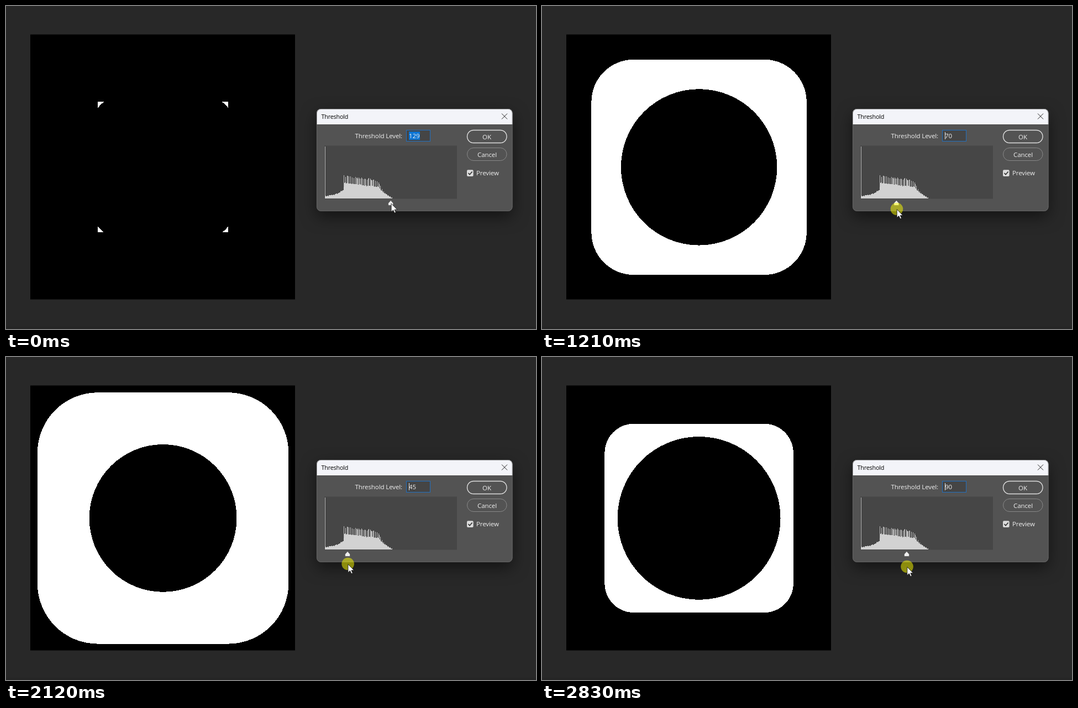
Animation of 959 by 584 pixels, one loop 2.93 s. Source, as an HTML page:

```html
<!DOCTYPE html>
<html lang="en">
<head>
<meta charset="utf-8">
<title>Threshold</title>
<style>
  html, body { margin: 0; width: 100%; height: 100%; overflow: hidden; background: #282828; }
  svg { display: block; }
  text { font: 11.5px "Open Sans", "Noto Sans", sans-serif; letter-spacing: -.1px; fill: #f0f0f0; }
  .title { font-size: 10.8px; letter-spacing: -.2px; fill: #000; }
  .mid { text-anchor: middle; }
  .crisp { shape-rendering: crispEdges; }
  .dialog { filter: drop-shadow(0 10px 14px rgba(0, 0, 0, .5)); }
</style>
</head>
<body>
<svg width="959" height="584" viewBox="0 0 959 584">
  <rect y="580" width="959" height="4" fill="#252525"/>

  <rect x="44" y="51.5" width="479" height="479"/>
  <g class="crisp">
    <rect id="square" fill="#fff"/>
    <circle id="disc" cx="284.1" cy="291.4"/>
  </g>

  <g class="dialog">
    <rect x="562" y="186" width="354.5" height="185" rx="8" fill="#535353"/>
    <path d="M562 214V194a8 8 0 0 1 8-8h338.5a8 8 0 0 1 8 8v20z" fill="#f3f4f9"/>
  </g>
  <rect x="562.4" y="186.4" width="353.7" height="184.2" rx="7.6" fill="none" stroke="#707070" stroke-width=".7"/>
  <text class="title" x="570.5" y="204">Threshold</text>
  <path d="M897 194.5l10 10m0-10l-10 10" stroke="#222"/>

  <text x="631.5" y="238.5">Threshold Level:</text>
  <rect x="724.5" y="224.5" width="43" height="20" fill="#454545" stroke="#2270c0"/>
  <rect id="selection" x="729" y="227" width="20" height="15" fill="#0a74d4"/>
  <text id="level" x="729" y="238.5"></text>
  <path id="caret" class="crisp" d="M729.5 228v13" stroke="#eee"/>

  <rect x="834.5" y="224.5" width="71.5" height="23" rx="11.5" fill="none" stroke="#dedede" stroke-width="1.4"/>
  <text class="mid" x="870" y="240.5">OK</text>
  <rect x="834.5" y="256.5" width="71.5" height="23" rx="11.5" fill="none" stroke="#888"/>
  <text class="mid" x="870.5" y="272.5">Cancel</text>
  <rect x="834" y="296.3" width="11.6" height="11.6" rx="2" fill="#dcdcdc"/>
  <path d="M836.5 302l2.5 2.8 4.5-5.3" fill="none" stroke="#333" stroke-width="1.7"/>
  <text x="851" y="306">Preview</text>

  <rect x="576" y="252.5" width="240" height="96" fill="#464646"/>
  <g class="crisp">
    <path d="M577.5 254v93" stroke="#b4b4b4" stroke-width="1.5"/>
    <path id="spikes" stroke="#bababa"/>
    <path id="bars" stroke="#d2d2d2"/>
  </g>

  <path id="slider" d="M0 351.5l4.5 5v4h-9v-4z" fill="#eee" stroke="#444" stroke-width=".6"/>
  <g id="pointer">
    <circle id="press" r="11.3" fill="#ff0" fill-opacity=".5"/>
    <path d="M.3 .7v15l3.5-3.3 2.5 5.3 2.3-1-2.3-5h4.8z" fill="#fff" stroke="#111" stroke-width=".8"/>
  </g>
</svg>

<script>
const $ = id => document.getElementById(id);
const set = (id, attrs) => {
  for (const name in attrs) $(id).setAttribute(name, attrs[name]);
};

// Piecewise linear curve through [x, y] points, held flat before the first
function curve(points, x) {
  const i = Math.max(1, points.findIndex(p => p[0] >= x));
  const [[x0, y0], [x1, y1]] = [points[i - 1], points[i]];
  return y0 + (y1 - y0) * Math.max(0, x - x0) / (x1 - x0);
}

let seed = 7;
const random = () => (seed = seed * 16807 % 2147483647) / 2147483647;

function drawHistogram() {
  const body = [[577, 3], [600, 8], [610, 15], [612, 28], [673, 20], [684, 9], [699, 0]];
  const peaks = [[611, 42], [666, 35], [674, 29], [685, 10], [699, 0]];
  let bars = "", spikes = "";
  for (let x = 577; x < 699; x++) {
    const column = height => `M${x}.5 347.5v${-Math.max(1, height)}`;
    bars += column(curve(body, x) + random() * 2 - 1);
    if (x > 610 && (x % 3 === 2 || random() < .25)) {
      spikes += column(curve(peaks, x) - random() * 3);
    }
  }
  set("bars", { d: bars });
  set("spikes", { d: spikes });
}

// The drag advances in equal ticks; both paths are [tick, value]
const LOOP = 2930, TICKS = 29;
const levelPath = [[1, 129], [7, 103], [8, 94], [12, 70], [15, 59], [17, 49], [18, 49],
  [21, 45], [22, 45], [26, 69], [28, 90]];
const heightPath = [[1, 356.5], [8, 361], [12, 367], [21, 374], [26, 375.3], [28, 379]];

function render(now) {
  const time = now % LOOP;
  const tick = Math.min(TICKS - 1, Math.floor((time + 6) * TICKS / LOOP));
  const level = Math.round(curve(levelPath, tick));
  const pressed = tick > 1;
  const trail = tick > 22 ? 2 : 0; // the preview trails the slider on the way back
  const grow = (129 - level) * 1.3 + trail;
  const half = 118 + grow;
  const x = 576.2 + level * .93;

  set("square", { x: 284.1 - half, y: 291.4 - half, width: half * 2, height: half * 2, rx: grow });
  set("disc", { r: 133.4 + (level - 45) * .312 });
  set("slider", { transform: `translate(${x})` });
  set("pointer", { transform: `translate(${x + .6} ${curve(heightPath, tick)})` });
  set("press", { opacity: +pressed });
  set("caret", { opacity: +pressed });
  set("selection", { opacity: +!pressed });
  $("level").textContent = level;
  requestAnimationFrame(render);
}

drawHistogram();
render(0);
</script>
</body>
</html>
```
